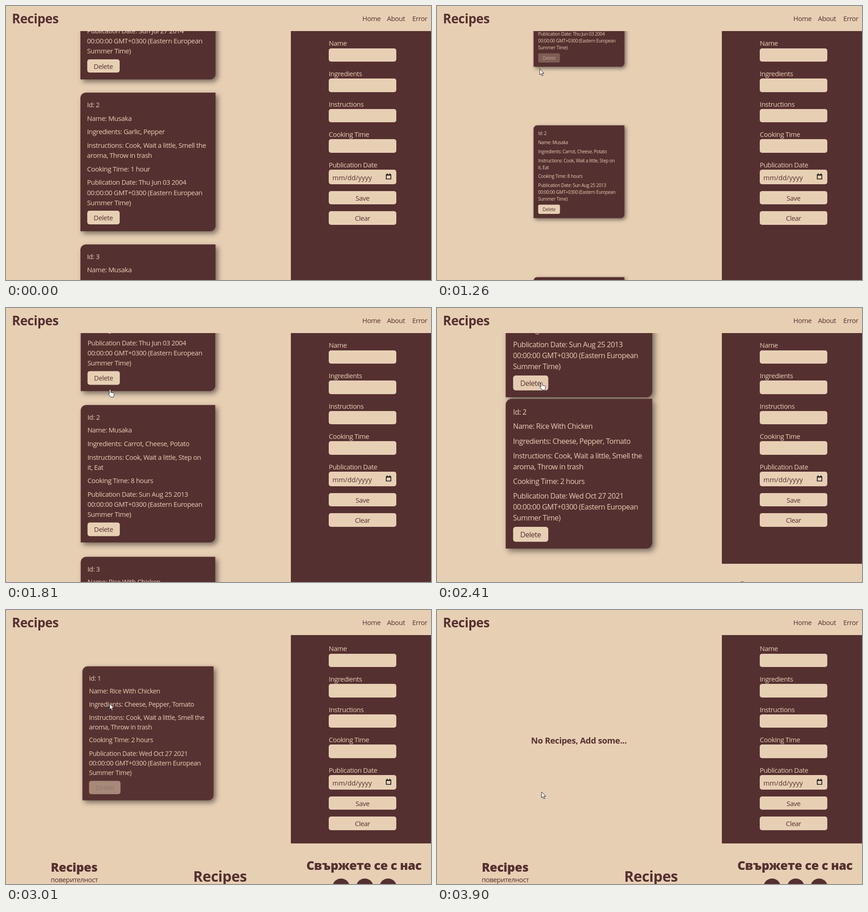
Recreate the animation shown at these times as an HTML page. Size 931 px wide and 601 px high, loop 4.23 s.

```html
<!DOCTYPE html>
<html lang="en">
<head>
<meta charset="utf-8">
<title>Recipes</title>
<style>
  :root { --tan: #e7cfb4; --dark: #553030; --lit: #74524d; }
  * { box-sizing: border-box; margin: 0; }
  html, body { width: 100%; height: 100%; overflow: hidden; background: var(--tan); }
  #stage {
    position: relative; width: 931px; height: 601px; overflow: hidden;
    color: var(--dark); background: var(--tan);
    font: 14.8px/22.2px "Open Sans", "Noto Sans", sans-serif;
    letter-spacing: -.03em; white-space: nowrap;
  }
  #stage > *, header *, footer * { position: absolute; left: 0; top: 0; }
  header { width: 100%; height: 55px; line-height: 55.5px; background: var(--tan); }
  .title { font-size: 27.75px; font-weight: 700; }
  .heavy { font-size: 26.7px; font-weight: 800; }
  .card {
    position: absolute; left: 162.8px; width: 296px; padding: 14.8px;
    color: var(--tan); background: var(--dark);
    border-radius: 12px 0; box-shadow: 5px 5px 12px rgba(0, 0, 0, .5);
  }
  .card p { margin-bottom: 7.4px; white-space: pre; }
  .button {
    --h: 0; height: 29.6px; border-radius: 5px; line-height: 31px; text-align: center;
    color: color-mix(in srgb, var(--tan) calc(var(--h) * 100%), var(--dark));
    background: color-mix(in srgb, var(--dark) calc(var(--h) * 100%), var(--tan));
  }
  .card .button { width: 71px; }
  #stage > #empty { left: 206px; top: 275px; font-size: 18.5px; font-weight: 700; letter-spacing: -.02em; }
  #stage > #panel { left: 624px; top: 55px; width: 307px; background: var(--dark); }
  #stage > #form { left: 707px; top: 70.4px; width: 148px; }
  #form p { color: var(--tan); }
  .field { height: 29.6px; margin-bottom: 14.8px; border-radius: 5px; background: var(--tan); }
  .date { position: relative; height: 31.8px; padding-left: 8px; line-height: 34px; letter-spacing: 0; }
  .date svg { position: absolute; left: 125px; top: 8px; }
  #form .button { margin-bottom: 14.8px; }
  footer i { width: 38px; height: 38px; border-radius: 50%; background: var(--dark); }
  #pointer { overflow: visible; }
  #pointer path { fill: #fff; stroke: #222; stroke-linejoin: round; }
</style>
</head>
<body>
<div id="stage">
  <div id="cards"></div>
  <div id="empty">No Recipes, Add some...</div>
  <div id="panel"></div>
  <div id="form"></div>
  <footer>
    <b class="heavy" style="left:98px;top:553px">Recipes</b>
    <span style="left:98px;top:580px">поверителност</span>
    <b class="title" style="left:410px;top:573px;font-size:31.8px">Recipes</b>
    <b class="heavy" style="left:658px;top:549px">Свържете се с нас</b>
    <i style="left:715px;top:589px"></i>
    <i style="left:767px;top:589px"></i>
    <i style="left:818px;top:589px"></i>
  </footer>
  <header>
    <span class="title" style="left:13px">Recipes</span>
    <span style="left:780.5px">Home</span>
    <span style="left:834.5px">About</span>
    <span style="left:890px">Error</span>
  </header>
  <svg id="pointer" width="1" height="1"><path/></svg>
</div>
<script>
const LOOP = 4230, POP = 700, FADE = 350;
const $ = id => document.getElementById(id);

// name, ingredients, instructions, cooking time, date
const recipes = [
  ['Musaka', 'Carrot, Pepper', 'Cook, Eat', '3 hours', 'Sun Jul 27 2014'],
  ['Musaka', 'Garlic, Pepper', 'Cook, Wait a little, Smell the\naroma, Throw in trash', '1 hour', 'Thu Jun 03 2004'],
  ['Musaka', 'Carrot, Cheese, Potato', 'Cook, Wait a little, Step on\nit, Eat', '8 hours', 'Sun Aug 25 2013'],
  ['Rice With Chicken', 'Cheese, Pepper, Tomato', 'Cook, Wait a little, Smell the\naroma, Throw in trash', '2 hours', 'Wed Oct 27 2021']
];
const deletions = [1162, 2067, 2815, 3780];

// [card index, from, to]
const cardHover = [[1, 480, 690], [0, 790, 1162], [0, 1880, 2067], [0, 2600, 2815], [0, 3000, 3780]];
const buttonHover = [[0, 900, 1162], [0, 1880, 2067], [0, 2440, 2815], [0, 3560, 3780]];
const handTimes = [[900, 1200], [1760, 2600], [3240, 3830]];

// [time, x, y]
const route = [[260, 752, 550], [500, 440, 350], [730, 236, 165], [930, 224, 136], [1260, 225, 138],
  [1810, 228, 179], [2040, 229, 163], [2860, 229.5, 164], [3370, 217.5, 360], [3600, 228, 393], [3900, 229, 399]];
const pop = [[0, .5], [.4, 1.1], [.8, .985], [1, 1]];

const ARROW = 'M0 0v13l3-2.7 2.1 4.7 2.1-.9-2-4.6h4.1z';
const HAND = 'M-1.5 1.2a1.5 1.5 0 0 1 3 0v5l6 1.3q1.6.4 1.4 2l-.6 4-1 3h-6l-5-6.5q-.3-1.6 1.2-1.5l1 1z';

const clamp = v => Math.min(1, Math.max(0, v));
const within = (t, from, to) => t >= from && t < to;

// Eased value of column `col` in rows that start with a time
function track(rows, t, col = 1) {
  const next = rows.findIndex(row => row[0] > t);
  if (next < 0) return rows.at(-1)[col];
  if (next === 0) return rows[0][col];
  const a = rows[next - 1], b = rows[next];
  const u = (t - a[0]) / (b[0] - a[0]);
  return a[col] + (b[col] - a[col]) * u * u * (3 - 2 * u);
}

function cardHtml([name, ingredients, instructions, time, date], i) {
  const lines = [`Id: ${i + 1}`, `Name: ${name}`, `Ingredients: ${ingredients}`, `Instructions: ${instructions}`,
    `Cooking Time: ${time}`, `Publication Date: ${date}\n00:00:00 GMT+0300 (Eastern European\nSummer Time)`];
  return `<div class="card">${lines.map(line => `<p>${line}</p>`).join('')}<div class="button">Delete</div></div>`;
}

$('form').innerHTML =
  ['Name', 'Ingredients', 'Instructions', 'Cooking Time'].map(s => `<p>${s}</p><div class="field"></div>`).join('') +
  `<p>Publication Date</p><div class="field date">mm/dd/yyyy<svg width="12" height="14">
  <path d="M1 3h10v9.5H1zM1 4h10M3 0v3M9 0v3" fill="none" stroke="#111" stroke-width="1.6"/></svg></div>` +
  '<div class="button">Save</div><div class="button">Clear</div>';

let shown = -1;
function showState(state) {
  shown = state;
  $('cards').innerHTML = recipes.slice(state).map(cardHtml).join('');
  let top = state === 3 ? 118.6 : -120.2;
  for (const card of $('cards').children) {
    card.style.top = top + 'px';
    top += card.offsetHeight + 29.6;
  }
  $('empty').hidden = state < 4;
  $('panel').style.height = [546, 546, 506, 457, 457][state] + 'px';
  $('form').style.transform = `translateY(${state > 2 ? 3 : 0}px)`;
  document.querySelector('footer').style.transform = `translateY(${[200, 200, 49, 0, 0][state]}px)`;
}

function draw() {
  const t = performance.now() % LOOP;
  const state = deletions.filter(d => t >= d).length;
  if (state !== shown) showState(state);

  const scale = state ? track(pop, (t - deletions[state - 1]) / POP) : 1;
  [...$('cards').children].forEach((card, i) => {
    const lit = cardHover.reduce((sum, [n, from, to]) =>
      sum + (n === i && within(t, from, to) ? clamp((t - from) / 150) : 0), 0);
    const pressed = buttonHover.reduce((sum, [n, from, to]) =>
      sum + (n === i ? clamp((t - from) / FADE) - clamp((t - to) / FADE) : 0), 0);
    card.style.transform = `scale(${scale})`;
    card.style.background = `color-mix(in srgb, var(--lit) ${lit * 100}%, var(--dark))`;
    card.lastChild.style.setProperty('--h', pressed);
  });

  const hand = handTimes.some(([from, to]) => within(t, from, to));
  $('pointer').style.visibility = t < 260 ? 'hidden' : 'visible';
  $('pointer').style.transform = `translate(${track(route, t, 1)}px, ${track(route, t, 2)}px)`;
  $('pointer').firstChild.setAttribute('d', hand ? HAND : ARROW);
  requestAnimationFrame(draw);
}
draw();
</script>
</body>
</html>
```
